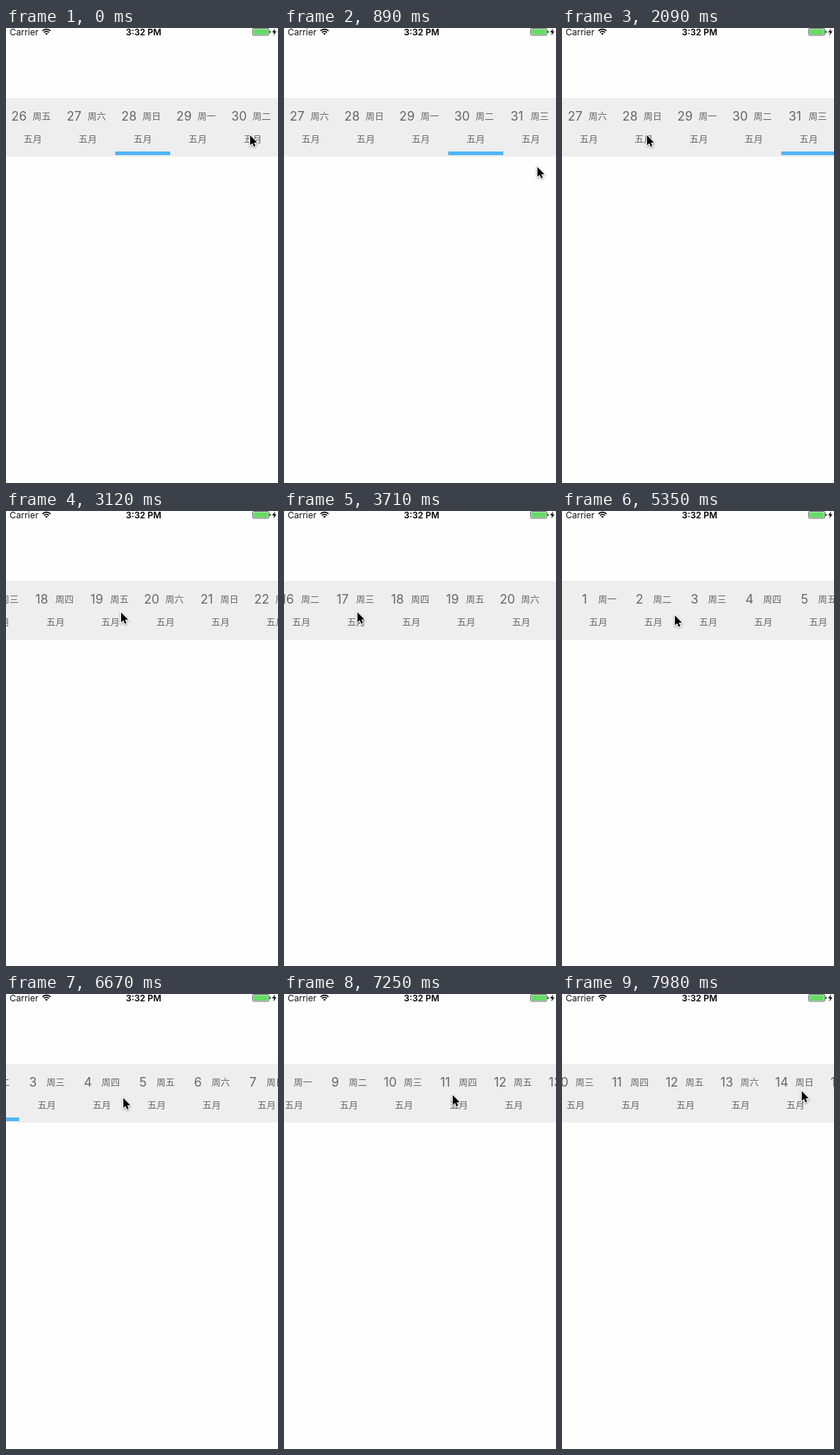
An HTML page with a canvas that plays this animation: 371x619 px, repeating every 8 s.

```html
<!DOCTYPE html>
<html lang="zh">
<head>
<meta charset="utf-8">
<title>Date strip</title>
<style>
  html, body { margin: 0; width: 100%; height: 100%; overflow: hidden; background: #fefefe; }
  canvas { display: block; width: 371px; height: 619px; }
</style>
</head>
<body>
<canvas id="stage"></canvas>
<script>
const W = 371, H = 619, LOOP = 8000;
const CELL = 75, DAYS = 31, TAU = 500;
const WEEK = '一二三四五六日';
const CJK = '12.5px "Noto Sans CJK SC", "Noto Sans CJK", sans-serif';
const LATIN = 'Inter, sans-serif';

const canvas = document.getElementById('stage');
const ctx = canvas.getContext('2d');
const dpr = window.devicePixelRatio || 1;
canvas.width = W * dpr;
canvas.height = H * dpr;

const smooth = u => u * u * (3 - 2 * u);
const part = (t, a, b) => Math.min(1, Math.max(0, (t - a) / (b - a)));
const mix = (a, b, u) => a + (b - a) * u;

function snap(t) {
  if (t < 6090) return Math.floor((t + 9) / 148.5) * 148.5;
  return 6087 + Math.floor((t - 6087) / 145.3) * 145.3;
}

// A drag speeds up until release; a fling then slows towards its rest.
const drag = (t, start, end, from, to) => mix(from, to, part(t, start, end) ** 2);
const fling = (t, start, from, rest) => mix(rest, from, Math.exp((start - t) / TAU));
const bounce = age => -0.93 * age * Math.exp(-age / 90);

function scrollAt(t) {
  if (t < 2120) return mix(1875, 1950, smooth(part(t, 60, 380)));
  if (t < 2290) return drag(t, 2120, 2290, 1950, 1892);
  if (t < 4310) return fling(t, 2290, 1892, 1091);
  if (t < 4502) return drag(t, 4310, 4502, 1105, 1000);
  if (t < 5076) return fling(t, 4502, 1000, -465);
  if (t < 6420) return bounce(t - 5076);
  if (t < 6620) return drag(t, 6420, 6620, 0, 70);
  return fling(t, 6620, 70, 737);
}

function selectedAt(t) {
  if (t < 100) return 28;
  if (t < 1480) return 30;
  return t < 5600 ? 31 : 2;
}

// Where the hand turns or rests: time, x, y
const TURNS = [
  [450, 333, 146], [1040, 348, 197], [1500, 336, 150], [2080, 116, 146],
  [2290, 174, 143], [3118, 157, 138], [4306, 43.6, 137.6], [4502, 148, 140],
  [5346, 154, 142], [5700, 122, 150], [5950, 122, 150], [6420, 236, 146],
  [6668, 160, 141.5], [7970, 327, 132]
];

function pointerAt(t) {
  const next = TURNS.findIndex(k => k[0] >= t);
  if (next <= 0) return TURNS.at(next).slice(1);
  const [t0, x0, y0] = TURNS[next - 1];
  const [t1, x1, y1] = TURNS[next];
  const u = smooth(part(t, t0, t1));
  return [mix(x0, x1, u), mix(y0, y1, u)];
}

function text(str, x, y, font, color, align = 'center') {
  ctx.font = font;
  ctx.fillStyle = color;
  ctx.textAlign = align;
  ctx.fillText(str, x, y);
}

function drawWifi(x, y) {
  const from = -Math.PI * 0.75, to = -Math.PI * 0.25;
  ctx.strokeStyle = ctx.fillStyle = '#000';
  ctx.lineWidth = 1.7;
  for (const r of [4.7, 7.7]) {
    ctx.beginPath();
    ctx.arc(x, y, r, from, to);
    ctx.stroke();
  }
  ctx.beginPath();
  ctx.moveTo(x, y);
  ctx.arc(x, y, 2.6, from, to);
  ctx.fill();
}

function drawBattery() {
  ctx.lineWidth = 1;
  ctx.strokeStyle = '#666';
  ctx.beginPath();
  ctx.roundRect(336.5, 0.5, 22, 9.5, 1.5);
  ctx.stroke();
  ctx.fillStyle = '#66db66';
  ctx.fillRect(337.5, 1.5, 20, 7.5);
  ctx.fillStyle = '#333';
  ctx.beginPath();
  ctx.arc(359.4, 5.2, 1.7, -Math.PI / 2, Math.PI / 2);
  ctx.fill();
  ctx.fillStyle = '#000';
  ctx.fill(new Path2D('M367.2 .6 L363 6 H365.7 L364.6 10.2 L369 4.6 H366.2 Z'));
}

function drawStatus() {
  text('Carrier', 5, 10, '12px ' + LATIN, '#111', 'left');
  text('3:32 PM', 187.7, 10, '600 12px ' + LATIN, '#000');
  drawWifi(55.2, 9.4);
  drawBattery();
}

function drawStrip(scroll, selected) {
  ctx.fillStyle = '#eee';
  ctx.fillRect(0, 95, W, 80);
  for (let day = 1; day <= DAYS; day++) {
    const x = (day - 1) * CELL - scroll - 1;
    if (x < -CELL || x > W) continue;
    text(day, x + 18.8, 126, '17px ' + LATIN, '#666');
    text('周' + WEEK[(day - 1) % 7], x + 49.8, 125, CJK, '#666');
    text('五月', x + 37.5, 155.5, CJK, '#666');
    if (day === selected) {
      ctx.fillStyle = '#50b5f5';
      ctx.fillRect(x, 168, CELL, 5);
    }
  }
}

const ARROW = new Path2D('M0 0 V13.6 L3.1 10.8 L5.2 15.5 L7.3 14.6 L5.3 10 L9.5 9.8 Z');

function drawPointer(x, y) {
  ctx.save();
  ctx.translate(x, y);
  ctx.shadowColor = 'rgba(0,0,0,0.4)';
  ctx.shadowBlur = 2.5 * dpr;
  ctx.shadowOffsetY = dpr;
  ctx.strokeStyle = '#fff';
  ctx.lineWidth = 2;
  ctx.stroke(ARROW);
  ctx.shadowColor = 'transparent';
  ctx.fillStyle = '#000';
  ctx.fill(ARROW);
  ctx.restore();
}

function draw() {
  const t = snap(performance.now() % LOOP);
  ctx.setTransform(dpr, 0, 0, dpr, 0, 0);
  ctx.fillStyle = '#fefefe';
  ctx.fillRect(0, 0, W, H);
  drawStatus();
  drawStrip(Math.round(scrollAt(t)), selectedAt(t));
  drawPointer(...pointerAt(t));
  requestAnimationFrame(draw);
}
draw();
</script>
</body>
</html>
```
